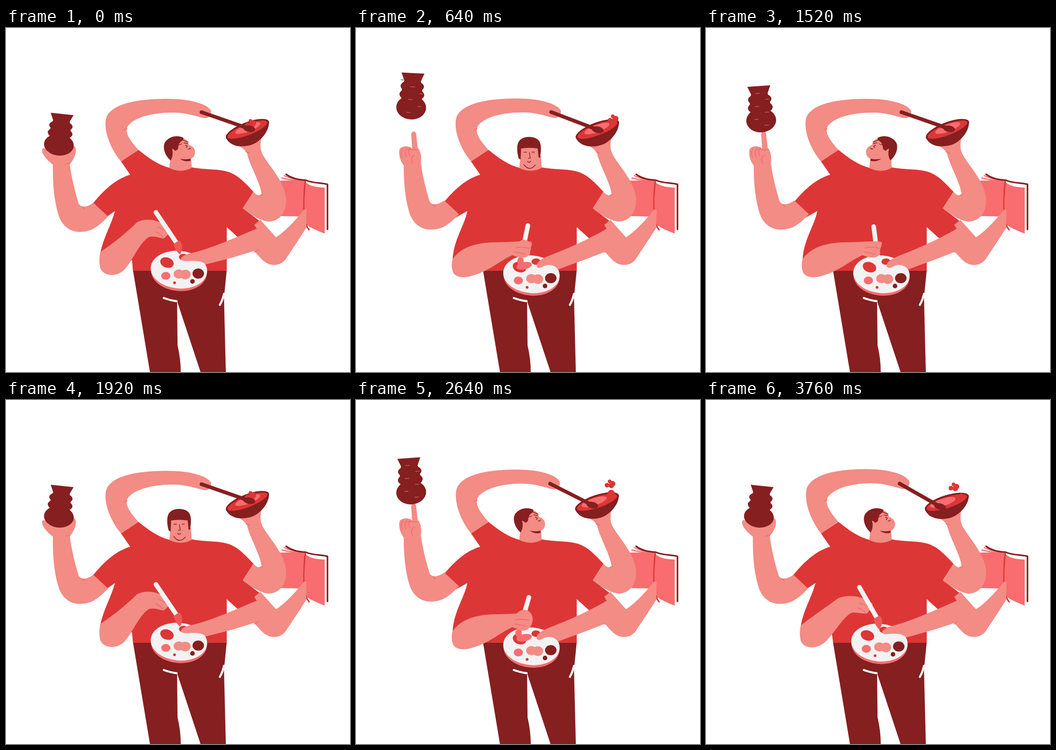
Write an HTML page with a canvas that moves like this. It is 748 px wide and 748 px high and loops after 3800 ms.

```html
<!DOCTYPE html>
<html lang="en">
<head>
<meta charset="utf-8">
<title>Many hands</title>
<style>
html, body { margin: 0; width: 100%; height: 100%; overflow: hidden; background: #fff; }
canvas { display: block; width: 748px; height: 748px; }
</style>
</head>
<body>
<canvas id="stage"></canvas>
<script>
const canvas = document.getElementById('stage');
const g = canvas.getContext('2d');
const dpr = window.devicePixelRatio || 1;
canvas.width = canvas.height = 748 * dpr;

const RED = '#dd3636', SKIN = '#f28c85', DARK = '#851f20', PINK = '#f96c6f', PALE = '#f2f2f2';
const LOOP = 3800, CYCLE = 1920, STEP = 80, STIR = 6;

// Drawing helpers
const fill = (d, c) => { g.fillStyle = c; g.fill(new Path2D(d)); };
const line = (d, c, w) => {
  g.strokeStyle = c; g.lineWidth = w;
  g.lineCap = g.lineJoin = 'round';
  g.stroke(new Path2D(d));
};
const oval = (x, y, rx, ry, c, rad = 0) => {
  g.fillStyle = c;
  g.beginPath();
  g.ellipse(x, y, rx, ry, rad, 0, 7);
  g.fill();
};
const place = (x, y, deg, draw, sx = 1, sy = 1) => {
  g.save();
  g.translate(x, y);
  g.rotate(deg * Math.PI / 180);
  g.scale(sx, sy);
  draw();
  g.restore();
};

// Motion helpers
const lerp = (a, b, t) => a + (b - a) * t;
const ramp = (a, b, t) => Math.min(1, Math.max(0, (t - a) / (b - a)));
const smooth = (a, b, t) => { const k = ramp(a, b, t); return k * k * (3 - 2 * k); };
const bump = (a, b, t) => Math.sin(Math.PI * ramp(a, b, t));
const hold = (a, b, c, d, t) => smooth(a, b, t) * (1 - smooth(c, d, t));
const NUM = /-?\d+(\.\d+)?/g;
const mix = (a, b, t) => {
  const to = b.match(NUM);
  let i = 0;
  return a.replace(NUM, n => lerp(+n, +to[i++], t).toFixed(2));
};

function book(w) {
  const page = (a, b) => fill(mix(a, b, w), PINK);
  const stroke = (a, b, c, n) => line(mix(a, b, w), c, n);
  page('M594 332C610 332 635 330 649 335L649 410 598 409Z',
       'M624 338C645 340 662 338 683 334L655 410 612 408Z');
  page('M650 334C662 346 680 346 693 347L693 447C680 442 665 436 649 425Z',
       'M683 334C692 345 704 357 711 369L686 447C672 440 655 420 643 405Z');
  stroke('M605 321C620 329 636 330 651 333', 'M628 329C648 334 668 331 684 333', PINK, 2.5);
  stroke('M600 326C616 331 636 332 651 334', 'M627 334C648 337 668 335 684 334', PINK, 2.5);
  stroke('M609 318C622 328 638 330 652 331C668 338 684 336 699 340L699 438',
         'M629 324C648 328 668 328 687 331C698 340 706 352 716 364L692 449', DARK, 3.5);
  if (w < .5) line('M651 333C647 355 648 385 648 405Q650 428 659 439', RED, 3);
  else line('M683 335C668 360 645 370 643 404M683 335C670 360 684 370 678 372Q662 395 660 420', SKIN, 2);
}

function body(w) {
  fill('M276 526L480 526 474 586 478 748 423 748 372 594 373 690Q380 720 380 748L313 748Z', DARK);
  line('M343 587Q356 592 371 594M465 602Q471 592 474 578', '#fff', 4.5);
  const side = mix('L276 528 274 505 240 512 205 489C212 455 228 430 237 398',
                   'L278 528 272 520 240 514 210 505C212 460 236 430 242 398', w);
  fill('M187 383L191 379C215 350 240 328 270 319L250 290 288 265C310 283 332 298 355 304Q380 316 404 303' +
       'C440 310 470 304 495 318C510 326 525 342 538 356L515 392 552 420 540 428 546 437 511 461 480 433 480 528' +
       side + 'L217 412Z', RED);
}

function bookArm() {
  fill('M553 417L587 455C606 444 635 412 646 397C652 391 656 397 653 405L653 434C640 455 620 485 608 503C595 519 575 518 562 508C552 500 545 490 540 486L546 437 540 428Z', SKIN);
  line('M540 487Q552 482 556 468', PINK, 2);
}

function sideHead() {
  fill('M358 262L385 240C394 242 396 248 398 254C408 258 412 264 411 272C410 280 405 284 398 285L380 286 358 288Z', SKIN);
  fill('M358 288C344 276 340 258 346 248C355 235 374 232 386 239L385 244C378 247 375 252 374 263L369 267C366 266 364 262 361 263C364 272 362 282 358 288Z', DARK);
  fill('M378 284Q390 287 401 284L401 289Q388 292 378 284Z', DARK);
  line('M385 244L396 248M376 254Q379 254 382 252M387 250L395 251M390 255Q397 256 392 260M396 263Q399 264 401 261', DARK, 1.5);
}

function frontHead(dx) {
  g.save();
  g.translate(dx * .4, 0);
  fill('M357 258L397 258 397 285C394 298 387 308 377 308C367 308 360 298 357 285Z', SKIN);
  fill('M354 284C350 272 349 254 354 247C362 233 392 234 399 247C404 256 402 272 400 282L397 282 395 262Q377 259 359 262L358 286Z', DARK);
  g.translate(dx * .6, 0);
  line('M365 270L371 270M383 270L388 270M377 271L379 283 375 283M373 290Q377 294 380 290M365 297Q377 313 390 298', DARK, 1.5);
  g.restore();
}

function head(t) {
  fill('M358 278L355 304Q380 317 404 304L402 278Z', SKIN);
  const turn = [640 - t, t - 1920].find(d => Math.abs(d) <= 40);
  if (turn !== undefined) frontHead(turn * .15);
  else if (t > 640 && t < 1920) place(759, 0, 0, sideHead, -1);
  else sideHead();
}

function bowl(w) {
  fill('M-50 0C-48 22 -25 33 -2 34C20 34 45 18 50 0Z', DARK);
  oval(0, 0, 50, 16, DARK);
  oval(0, 0, 46, 12, RED);
  oval(lerp(2, -13, w), -3, 29, 8, PINK);
}

function cooking(u) {
  const w = Math.sin(Math.PI * u * u) ** 2;
  fill('M538 356Q547 367 556 363C553 335 530 300 524 272C518 262 512 261 506 255L555 240C552 255 553 265 558 275C575 305 612 340 609 380C607 405 592 421 570 421C550 418 530 404 515 392Z', SKIN);
  line('M552 364L558 362M522 269L529 272', PINK, 2);

  // The reaching arm stretches from its sleeve
  place(270, 278, 0, () => {
    g.translate(-270, -278);
    fill('M250 290C226 262 211 220 218 195C232 160 300 154 352 154C400 154 438 165 446 180C447 192 438 199 426 195C408 190 388 184 365 184C320 183 275 195 264 215C258 228 270 245 288 265Z', SKIN);
    line('M257 221L263 219', PINK, 2);
  }, 1 - .03 * w, 1 + .045 * w);

  place(525 - 2 * w, 221 + 3 * w, 5 * w - 21, () => bowl(w));

  // Food leaves the rim, arcs up and falls back to the left
  const swell = bump(.2, .9, u);
  oval(555, 206, 9 * swell, 11 * swell, RED);
  const v = u || 1;
  for (let k = 0; k < 4; k++) {
    const x = 551 - 40 * (v - .5) + 7 * Math.cos(k * 2.4);
    const y = 207 - 29 * bump(.25, 1, v) + 5 * Math.sin(k * 2.4);
    if (v > .3) oval(x, y, 6 - k % 3, 6 - k % 3, RED);
  }

  const x = 529 - 30 * w, y = 219 + 19 * w;
  line(`M${425 - 6 * w} ${183 - 2 * w}L${x} ${y}`, DARK, 8);
  oval(x, y, 13, 7, DARK, .15 + .15 * w);
}

function palette(w, mixing) {
  place(5.5 * w, 10 * w, 0, () => {
    oval(376, 530, 61, 42, PINK, .09);
    oval(376, 525.5, 61.5, 41, PALE, .09);
    oval(350, 510, 15, 11, RED, .35);
    if (w > .7) oval(360, 507, 17 * mixing, 8 * mixing, PINK, -.2);
    oval(347.5, 539, 10, 8.5, PINK);
    oval(376, 535, 11.5, 10, SKIN);
    oval(390, 536, 11.5, 10.5, SKIN);
    oval(418, 534, 12.5, 11, DARK);
    oval(405.5, 551, 5, 5, DARK);
    oval(366.5, 554, 3, 3, RED);
    oval(386, 498, 10, 7, RED);
  });
  fill(mix('M381 500C386 493 396 491 409 488C450 478 500 455 546 436L585 455 560 470C553 482 543 484 535 486C505 496 465 507 434 514C425 504 402 507 390 507C382 506 379 504 381 500Z',
           'M393 518C392 508 405 502 415 497C455 482 505 460 546 436L585 455 560 470C557 480 550 486 540 487C510 499 470 514 439 525C432 515 418 513 408 518C400 523 394 523 393 518Z', w), SKIN);
}

function painting(w, fist) {
  const x1 = lerp(326, lerp(364, 376, fist), w), y1 = lerp(401, lerp(432, 429, fist), w);
  const x2 = lerp(370, lerp(374, 356, fist), w), y2 = lerp(466, 498, w);
  const brush = () => {
    line(`M${x1} ${y1}L${x2} ${y2}`, PALE, 10);
    place(x2, y2, Math.atan2(y2 - y1, x2 - x1) * 180 / Math.PI, () => {
      if (w > .6) oval(9, 0, 9, 7, fist > .5 ? PINK : PALE);
      else fill('M0 -7C6 -11 18 -8 27 8C18 11 4 10 0 6Z', '#ee5857');
    });
  };
  if (w >= .6) brush();
  fill(mix('M205 487C225 474 262 446 285 422C309 411 335 418 357 437C358 444 350 452 343 458C332 456 322 451 310 455C288 470 278 502 258 525C240 543 212 540 205 522C202 508 203 498 205 487Z',
           'M210 503C225 480 255 467 300 466C330 466 365 462 381 465C386 472 376 478 379 490C372 503 355 500 340 494C315 505 290 528 255 538C230 547 212 540 210 528C207 518 208 510 210 503Z', w), SKIN);
  oval(364, 479, 20 * fist, 23 * fist, SKIN, .3);
  line(mix('M331 433Q343 437 354 446M326 443Q334 446 342 456',
           'M347 478Q362 475 376 479M345 487Q356 488 368 492', w), PINK, 2);
  if (w < .6) brush();
}

function jar(frame, spin) {
  fill('M-25 -75L25 -75 18 -58 22 -45 22 0 -22 0 -22 -45 -18 -58Z', DARK);
  oval(0, -46, 25.5, 13, DARK);
  oval(0, -28, 27, 14, DARK);
  oval(0, 0, 32.5, 26, DARK);
  for (let k = 0; spin && k < 6; k++) {
    const x = (k * 21 + frame % 2 * 17) % 45 - 25;
    line(`M${x} ${14 * k - 59}h${10 - Math.abs(x) / 5}`, '#c0504e', 1.8);
  }
}

function juggling(p) {
  const dip = bump(80, 560, p);
  const up = hold(400, 640, 1600, 1760, p);
  const held = p < 520 || p >= 1760;
  const spin = p >= 640 && p <= 1600;
  const frame = p / STEP;

  place(2 * (dip + up), 7 * dip - 5 * up, 0, () => {
    fill('M190 380C178 389 164 392 158 382C150 355 142 325 138 291L102 291C101 340 105 380 116 412C130 445 160 448 185 439C200 432 212 420 222 410Z', SKIN);
    line('M166 389L170 393', PINK, 2);
    if (held) {
      fill('M102 297C90 288 75 272 79 263C83 258 88 264 92 270L140 270C141 262 146 254 150 258C156 268 148 286 138 297Z', SKIN);
      line('M130 296L138 294', PINK, 2);
    } else {
      fill('M102 304C94 295 90 280 93 268C100 260 113 261 120 267L118 236Q119 230 124 230Q129 231 129 237L132 265C141 275 141 291 138 304Z', SKIN);
      // Curled fingers
      for (let k = 0; k < 3; k++) line(`M${100 + 8 * k} ${267 - k}q-6 10 -1 ${20 - k}`, PINK, 1.8);
      line('M110 269L131 270M125 282Q115 286 121 299', PINK, 1.8);
    }
  });

  const tilt = spin ? (frame % 2 ? -4 : 3) : 6 * (1 - dip) * (1 - up);
  const x = 115 + 2 * dip + 5 * up;
  const y = 254 + 9 * dip - 53 * up - 36 * bump(440, 720, p);
  place(x, y, tilt, () => jar(frame, spin), 1, lerp(.9, 1, Math.max(dip, up)));
  if (held && dip > .5) fill('M134 292C136 280 130 270 135 265C142 262 146 270 146 277L148 290Z', SKIN);
}

function draw(ms) {
  const t = ms % LOOP;
  const step = Math.floor(t / STEP);
  const p = step * STEP % CYCLE;
  const paint = hold(0, 320, 1540, 1960, p);
  const flip = hold(0, 240, 400, 640, p);
  // Two strokes alternate between a flat hand and a fist
  const fist = (1 - Math.cos(2 * Math.PI * 2 * ramp(440, 1560, p))) / 2;

  g.setTransform(dpr, 0, 0, dpr, 0, 0);
  g.fillStyle = '#fff';
  g.fillRect(0, 0, 748, 748);
  book(flip);
  body(paint);
  bookArm();
  head(Math.floor(t / 40) * 40);
  cooking(step % STIR / STIR);
  palette(paint, 1 - ramp(960, 1280, p));
  painting(paint, fist);
  juggling(p);
}

const start = performance.now();
function tick() {
  draw(performance.now() - start);
  requestAnimationFrame(tick);
}
tick();
</script>
</body>
</html>
```
